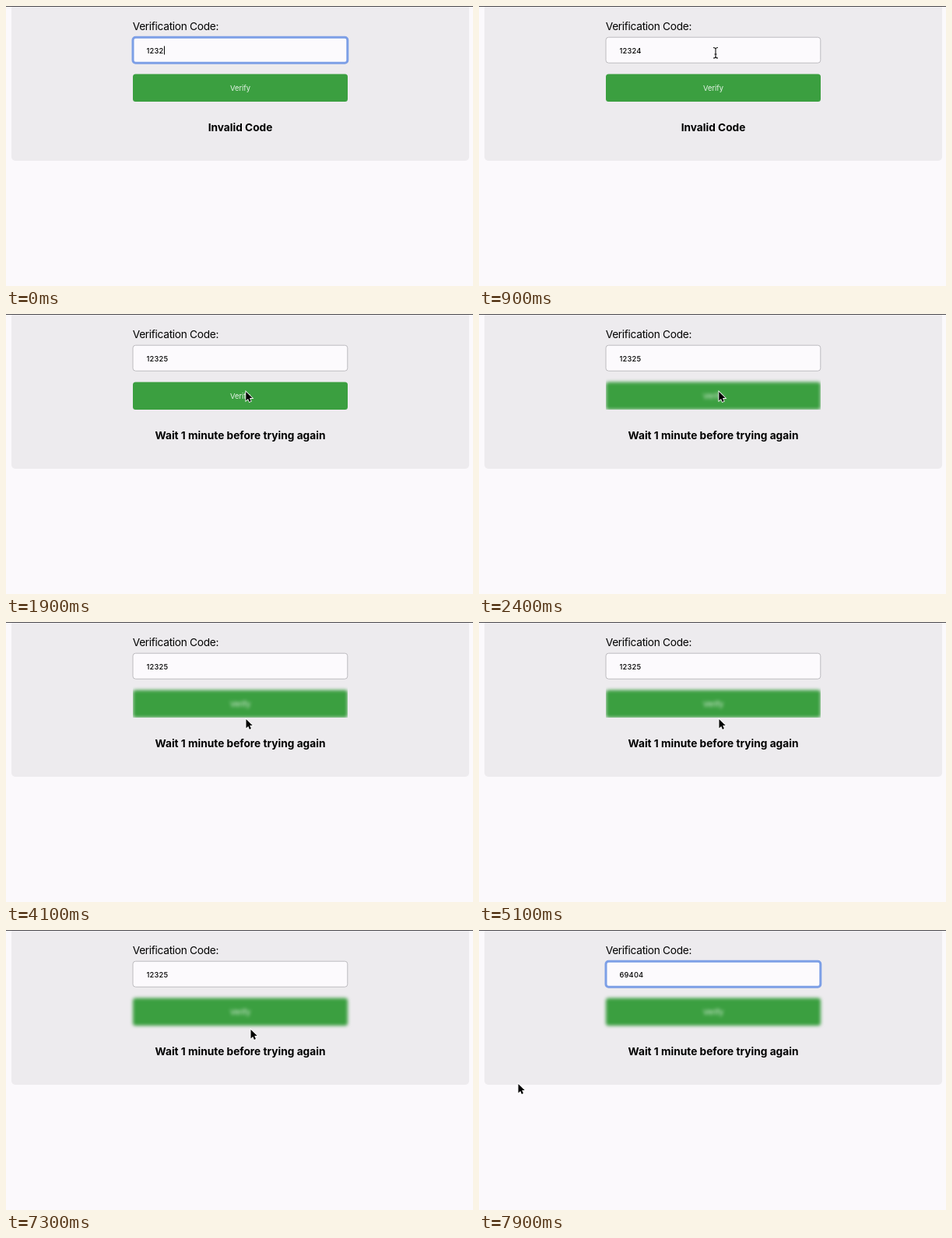
Write an HTML page that moves like this. It is 600 px wide and 360 px high and loops after 8000 ms.

```html
<!DOCTYPE html>
<html lang="en">
<head>
<meta charset="utf-8">
<title>Verification form</title>
<style>
  html, body { margin: 0; width: 100%; height: 100%; overflow: hidden; background: #fbf9fc; }
  svg { display: block; width: 600px; height: 360px; font-family: Inter, Roboto, sans-serif; }
  .button rect { fill: #3b9f40; }
  .button text { fill: #e9f5ea; font-size: 9.4px; text-anchor: middle; }
  .blurred { filter: blur(2px); }
  #field { fill: #fcfafd; stroke: #bdbbbf; }
  #field.focus { stroke: #7d9fe6; stroke-width: 3px; }
</style>
</head>
<body>
<svg viewBox="0 0 600 360">
  <clipPath id="sides"><path d="M163 79H439V123H163Z"/></clipPath>
  <rect id="panel" x="7" y="-10" width="588" rx="5" fill="#edebee"/>
  <rect width="600" height="1" fill="#4c4a4e"/>
  <text x="162.7" y="30.5" font-size="13.7" letter-spacing="-.3">Verification Code:</text>
  <rect id="field" x="163" y="40.2" width="275.8" height="33" rx="3.5"/>
  <text id="code" x="180.5" y="60.8" font-size="9.3" letter-spacing=".2" font-weight="500"></text>
  <rect id="caret" y="51.5" width="1" height="11"/>
  <g id="clip">
    <g id="verify" class="button">
      <rect x="163" y="87.5" width="276" height="35.5" rx="3.5"/>
      <text x="301" y="109">Verify</text>
    </g>
  </g>
  <text id="message" x="301" y="161.3" font-size="13.7" font-weight="700" text-anchor="middle"></text>
  <g id="resend" class="button">
    <rect x="163" y="189.5" width="276" height="35" rx="3.5"/>
    <text x="301" y="211">Send a new code</text>
  </g>
  <g id="mouse">
    <path id="arrow" d="M0 0V11.4L2.7 8.9 4.4 13 6.4 12.1 4.7 8.1H8.2Z" stroke="#fff" stroke-width="1.6" paint-order="stroke"/>
    <path id="beam" d="M-3 -6.5Q0 -6.5 0 -4.5Q0 -6.5 3 -6.5M0 -4.5V5M-3 7Q0 7 0 5Q0 7 3 7M-1.5 2H1.5" fill="none" stroke="#111" stroke-width="1.1"/>
  </g>
</svg>
<script>
const LOOP = 8000, STEP = 100, MOVE = 200;
const el = id => document.getElementById(id);
const set = (id, name, value) => el(id).setAttribute(name, value);
const show = (id, on) => set(id, 'display', on ? 'inline' : 'none');

const spots = {
  field: [304, 60], verify: [308.3, 100], below: [308.5, 125],
  aside: [322, 124.5], send: [325, 196], away: [50.5, 198]
};
const start = {
  code: '1232', message: 'Invalid Code', focus: true, caret: true,
  mouse: false, locked: false, resend: false, clipped: false
};
// What the visitor and the page do, and when
const script = [
  [200, { code: '12324' }],
  [300, { mouse: true, goal: 'verify' }],
  [500, { focus: false, caret: false }],
  [700, { goal: 'field' }],
  [1000, { focus: true, caret: true }],
  [1100, { mouse: false }],
  [1200, { code: '1232' }],
  [1300, { code: '12325' }],
  [1400, { mouse: true, goal: 'aside' }],
  [1500, { caret: false }],
  [1700, { goal: 'verify' }],
  [1800, { focus: false }],
  [1900, { message: 'Wait 1 minute before trying again' }],
  [2000, { locked: true, clipped: true, goal: 'send' }],
  [2200, { goal: 'verify' }],
  [2400, { goal: 'below' }],
  [6300, { resend: true }],
  [6700, { goal: 'send' }],
  [7100, { clipped: false }],
  [7200, { resend: false, goal: 'field' }],
  [7400, { focus: true }],
  [7600, { code: '69404' }],
  [7700, { goal: 'away' }]
];

function stateAt(t) {
  const state = { ...start, from: 'verify', goal: 'verify', left: 0 };
  for (const [time, change] of script) {
    if (time > t) break;
    if (change.goal) {
      state.from = state.goal;
      state.left = time;
    }
    Object.assign(state, change);
  }
  return state;
}

function pointer({ from, goal, left }, t) {
  const k = Math.min(1, (t - left) / MOVE);
  const eased = k * k * (3 - 2 * k);
  return spots[from].map((a, i) => a + (spots[goal][i] - a) * eased);
}

function draw(t) {
  const s = stateAt(t);
  const [x, y] = pointer(s, t);
  const overField = y > 40 && y < 74;

  set('panel', 'height', s.resend ? 258.5 : 209);
  el('field').classList.toggle('focus', s.focus);
  el('code').textContent = s.code;
  show('caret', s.caret);
  set('caret', 'x', 181 + el('code').getComputedTextLength());
  el('verify').classList.toggle('blurred', s.locked);
  set('clip', 'clip-path', s.clipped ? 'url(#sides)' : 'none');
  el('message').textContent = s.message;
  show('resend', s.resend);

  show('mouse', s.mouse);
  set('mouse', 'transform', `translate(${x} ${y})`);
  show('beam', overField);
  show('arrow', !overField);
}

function tick(now) {
  draw(Math.floor(now % LOOP / STEP) * STEP);
  requestAnimationFrame(tick);
}
draw(0);
requestAnimationFrame(tick);
</script>
</body>
</html>
```
